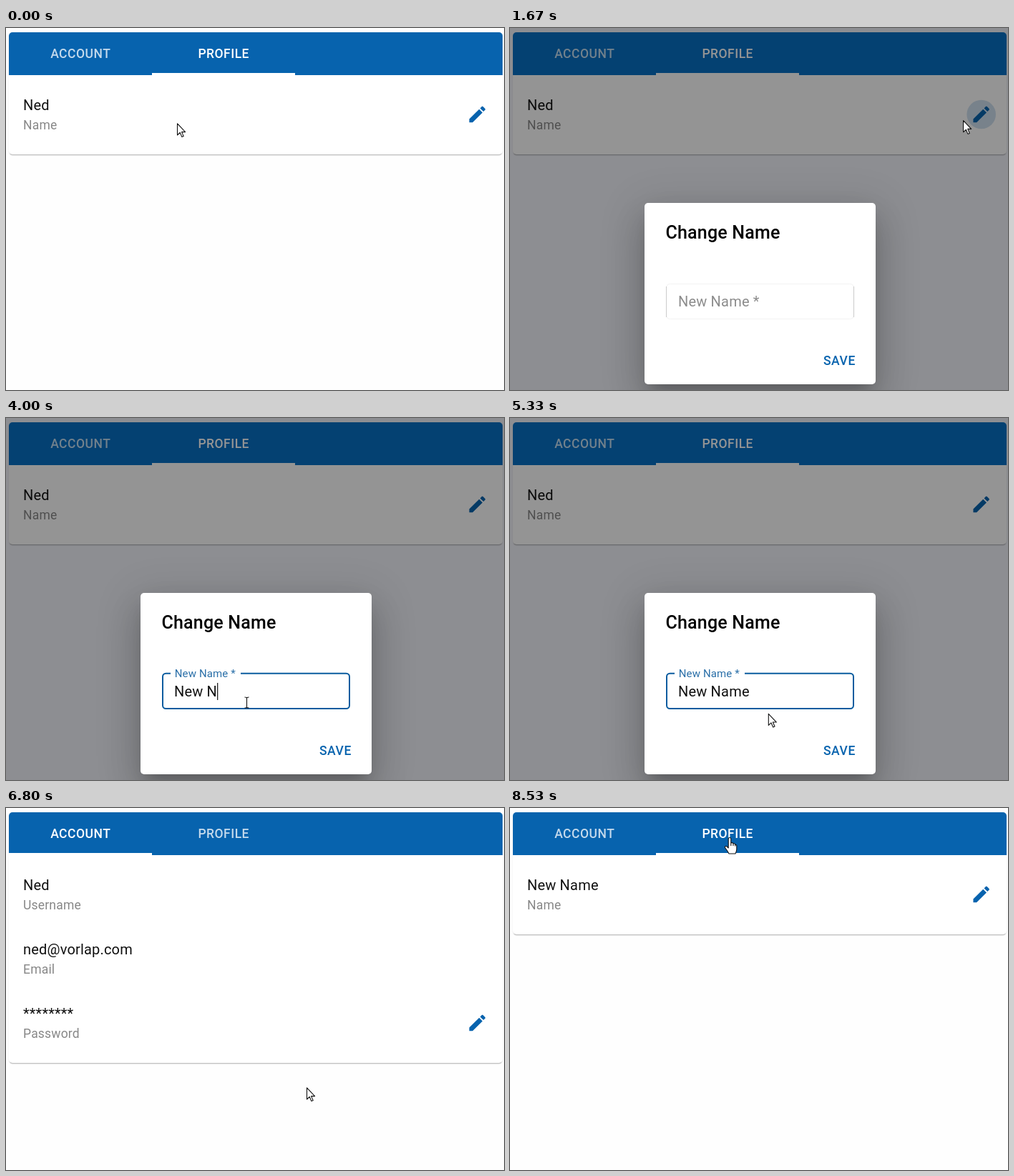
These frames come from a looping animation (696 by 507 pixels, 8.67 s). An HTML page:

```html
<!DOCTYPE html>
<html lang="en">
<head>
<meta charset="utf-8">
<title>Profile settings</title>
<style>
html, body { margin: 0; width: 100%; height: 100%; overflow: hidden; }
#stage {
  --dim: 0;
  --blue: #0763ae;
  --mix: calc(var(--dim) * 100%);
  position: relative; width: 696px; height: 507px; overflow: hidden;
  background: color-mix(in srgb, #fefefe, #f3f4fa var(--mix));
  font-family: Roboto, sans-serif;
}
#stage > * { position: absolute; left: 0; top: 0; }
#stage > #card {
  left: 4px; top: 6px; width: 690px; background: #fff; border-radius: 5px;
  box-shadow: 0 2.5px 1.2px -1.2px rgba(0,0,0,.2), 0 1px 2px rgba(0,0,0,.1);
}
#header {
  height: 60px; border-radius: 5px 5px 0 0;
  background: color-mix(in srgb, var(--blue), #0770c4 var(--mix));
}
#backdrop { width: 100%; height: 100%; background: #000; opacity: calc(var(--dim) * .42); }
#dialog { width: 100%; height: 100%; opacity: var(--dim); }
#paper {
  position: absolute; left: 188px; top: 245px; width: 323px; height: 253.5px;
  background: #fff; border-radius: 5px;
  box-shadow: 0 14px 19px -9px rgba(0,0,0,.2), 0 30px 48px 4px rgba(0,0,0,.14), 0 11px 58px 10px rgba(0,0,0,.12);
}
#dialog svg { position: absolute; left: 0; top: 0; }
text { white-space: pre; }
.tab, .button { font-size: 17.5px; font-weight: 500; letter-spacing: .5px; }
.tab { fill: #fff; text-anchor: middle; }
.value { font-size: 20px; letter-spacing: .19px; fill: #111; }
.caption { font-size: 17.5px; letter-spacing: .19px; fill: rgba(0,0,0,.47); }
.title { font-size: 25px; font-weight: 500; letter-spacing: .19px; }
.button, #pencil { fill: var(--blue); }
</style>
</head>
<body>
<div id="stage">
  <div id="card"><div id="header"></div></div>
  <svg width="696" height="507">
    <text id="accountTab" class="tab" x="104.2" y="42">ACCOUNT</text>
    <text id="profileTab" class="tab" x="304.2" y="42">PROFILE</text>
    <rect id="indicator" y="63" width="200" height="3.3" fill="#fff"/>
    <g id="profile">
      <text id="name" class="value" x="24" y="115"></text>
      <text class="caption" x="24" y="142">Name</text>
    </g>
    <g id="account">
      <text class="value" x="24" y="115">Ned</text>
      <text class="caption" x="24" y="142">Username</text>
      <text class="value" x="24" y="205">ned@vorlap.com</text>
      <text class="caption" x="24" y="232">Email</text>
      <text class="value" x="24" y="295">********</text>
      <text class="caption" x="24" y="322">Password</text>
    </g>
    <circle id="ripple" cx="658.7" cy="121" r="20.3" fill="#cfe0ee"/>
    <path id="pencil" d="M3 17.25V21h3.75L17.81 9.94l-3.75-3.75L3 17.25zM20.71 7.04c.39-.39.39-1.02 0-1.41l-2.34-2.34c-.39-.39-1.02-.39-1.41 0l-1.83 1.83 3.75 3.75 1.83-1.83z"/>
  </svg>
  <div id="backdrop"></div>
  <div id="dialog">
    <div id="paper"></div>
    <svg width="696" height="507">
      <text class="title" x="217.5" y="294.5">Change Name</text>
      <g id="resting" fill="none">
        <rect x="218.5" y="358.5" width="262" height="49" rx="5" stroke="#f3f3f3"/>
        <path d="M218.5 362V405M480.5 362V405" stroke="#ccc"/>
      </g>
      <g id="focused">
        <rect x="219" y="357.7" width="261" height="49.3" rx="4.5" fill="none" stroke="#0a5c9f" stroke-width="2"/>
        <rect id="notch" x="230" y="355" height="5" fill="#fff"/>
      </g>
      <text id="label" class="value"></text>
      <text id="input" class="value" x="235" y="390"></text>
      <path id="caret" d="M0 371V395" stroke="#111" stroke-width="1.2"/>
      <text class="button" x="438" y="472">SAVE</text>
    </svg>
  </div>
  <svg width="696" height="507">
    <g id="cursor" stroke="#111" stroke-width="1.1" fill="#fff" stroke-linejoin="round">
      <path id="arrow" d="M.5 .8V17L4.2 13.5L6.9 19.6L9.2 18.6L6.6 12.6H11.6Z"/>
      <path id="beam" fill="none" d="M-3 -7.5Q0 -7.5 0 -6.5Q0 -7.5 3 -7.5M0 -6.5V6.5M-3 7.5Q0 7.5 0 6.5Q0 7.5 3 7.5"/>
      <path id="hand" d="M-1.8 2Q-1.8 .5 0 .5T1.8 2V8Q4.5 7 5 9Q7.4 8.3 7.8 10.2Q9.8 10 9.8 12V17Q9.5 20 8 23H-1Q-3 19 -6.5 14.5Q-6.8 12 -4.3 12.7L-1.8 15ZM1.8 8V12M5 9V12M7.8 10.2V12.5"/>
    </g>
  </svg>
</div>
<script>
const LOOP = 8670, STEP = 1000 / 15;
const FOCUS = 2530, SAVED = 6130, TO_ACCOUNT = 6260, TO_PROFILE = 7860;
const TYPED = 'New Name';
const keyTimes = [3200, 3470, 3530, 3730, 4000, 4130, 4270, 4470];
const track = [ // time, x, y
  [0, 239, 133], [430, 239, 133], [600, 262, 132], [800, 400, 128], [1150, 600, 120],
  [1330, 646, 119], [1600, 646, 119], [1665, 634, 128], [1870, 520, 225], [2070, 400, 335],
  [2200, 349, 381], [2330, 336.5, 398.5], [5329, 336.5, 398.5], [5330, 360, 413],
  [5600, 425, 450], [5830, 455, 464], [6300, 455, 464], [6800, 420, 391],
  [7000, 380, 290], [7250, 325, 130], [7500, 307, 41], [LOOP, 307, 41]
];
const $ = id => document.getElementById(id);
const show = (id, on) => $(id).style.display = on ? '' : 'none';
const set = (id, attr, value) => $(id).setAttribute(attr, value);
const lerp = (a, b, k) => a + (b - a) * k;
const ease = (t, start, length) => {
  const k = Math.min(1, Math.max(0, (t - start) / length));
  return k * k * (3 - 2 * k);
};

function cursorAt(t) {
  const i = track.findIndex(p => p[0] > t);
  const a = track[i - 1], b = track[i], k = (t - a[0]) / (b[0] - a[0]);
  return [lerp(a[1], b[1], k), lerp(a[2], b[2], k)];
}

function drawPage(t, dim) {
  const account = t >= TO_ACCOUNT && t < TO_PROFILE;
  $('card').style.height = (account ? 350.5 : 170.5) + 'px';
  show('account', account);
  show('profile', !account);
  $('name').textContent = t < SAVED ? 'Ned' : TYPED;
  set('accountTab', 'fill-opacity', account ? 1 : .76);
  set('profileTab', 'fill-opacity', account ? .76 : 1);
  set('indicator', 'x', t < TO_ACCOUNT ? 204 : lerp(4, 204, ease(t, TO_PROFILE, 300)));
  set('pencil', 'transform', `translate(643.7 ${account ? 286 : 106}) scale(1.25)`);
  set('ripple', 'opacity', ease(t, 1540, 120) * (1 - ease(t, 1680, 250)));
  $('stage').style.setProperty('--dim', dim);
}

function drawDialog(t) {
  const focused = t >= FOCUS, lift = ease(t, FOCUS, 195);
  show('resting', !focused);
  show('focused', focused);
  set('notch', 'width', 98 * lift);
  $('label').style.fill = focused ? '#2a6fa8' : '#8c8c8c';
  set('label', 'transform',
    `translate(${lerp(235, 235.7, lift)} ${lerp(390, 362.5, lift)}) scale(${lerp(1, .75, lift)})`);

  const count = keyTimes.filter(k => k <= t).length;
  const input = $('input');
  input.textContent = TYPED.slice(0, count);
  const lastKey = count ? keyTimes[count - 1] : FOCUS;
  show('caret', focused && (t - lastKey) % 1000 < 500);
  set('caret', 'transform', `translate(${235.6 + (count ? input.getComputedTextLength() : 0)} 0)`);
}

function drawCursor(t, dim) {
  const [x, y] = cursorAt(t);
  const inside = (l, top, r, b) => x > l && x < r && y > top && y < b;
  const beam = dim > .5 && inside(218, 358, 481, 408);
  const hand = dim > .5 ? inside(428, 446, 493, 486)
    : y < 66 || (t < 1500 && Math.hypot(x - 658.7, y - 121) < 20);
  show('beam', beam);
  show('hand', hand);
  show('arrow', !beam && !hand);
  set('cursor', 'transform', `translate(${x} ${y})`);
}

function frame(now) {
  const t = Math.floor((now % LOOP + 5) / STEP) * STEP % LOOP;
  const dim = ease(t, 1530, 135) * (1 - ease(t, 5930, 195));
  drawPage(t, dim);
  drawDialog(t);
  drawCursor(t, dim);
  requestAnimationFrame(frame);
}

$('label').textContent = 'New Name *';
const start = performance.now();
requestAnimationFrame(function first() { frame(0); });
frame = (draw => () => draw(performance.now() - start))(frame);
</script>
</body>
</html>
```
